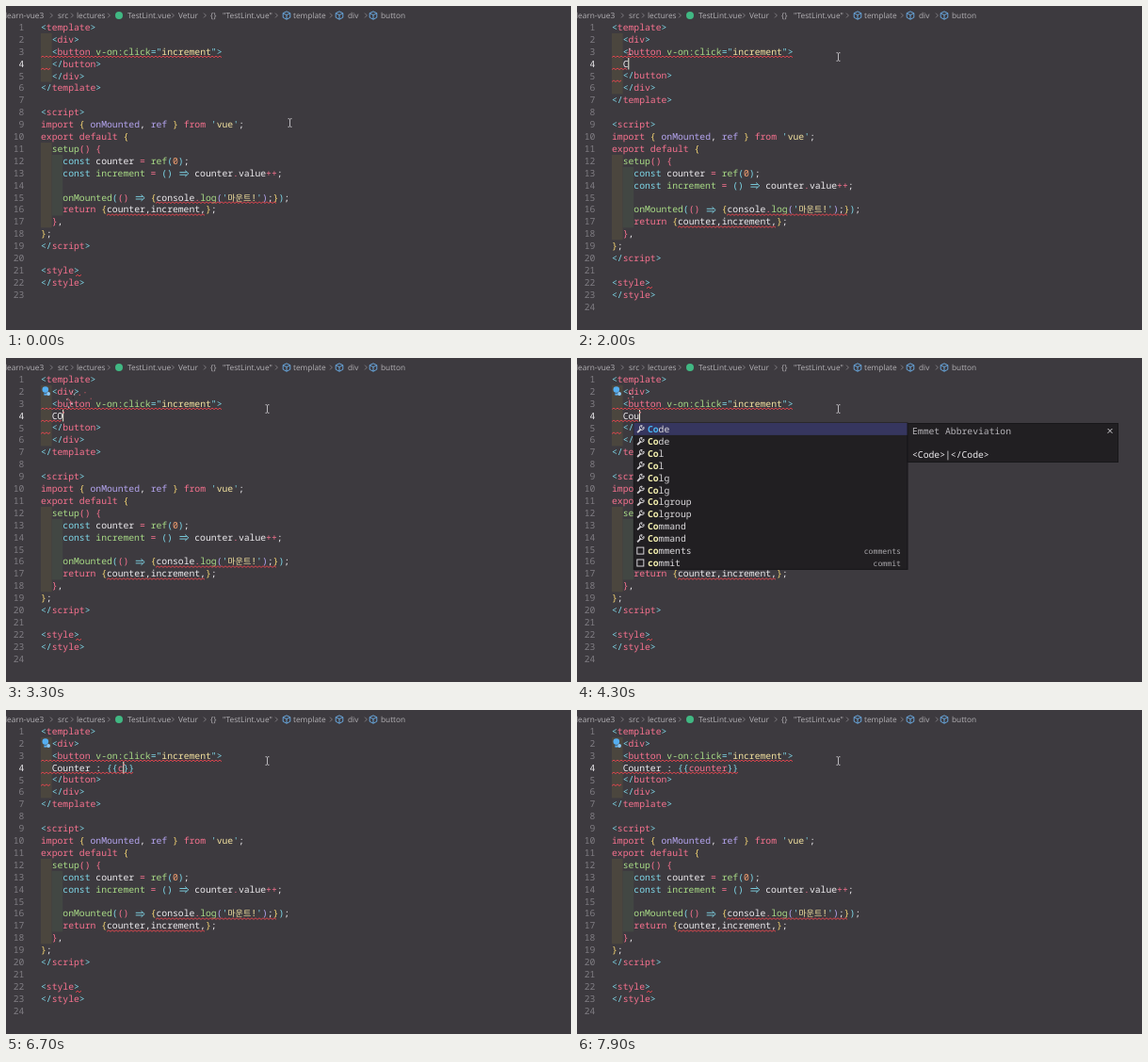
An HTML page that plays this animation: 600 px wide and 344 px high, repeating every 8 s.

```html
<!DOCTYPE html>
<html lang="en">
<head>
<meta charset="utf-8">
<title>Editor typing</title>
<style>
  html, body { margin: 0; width: 100%; height: 100%; overflow: hidden; background: #3d3a3f; }
  svg { display: block; width: 600px; height: 344px; }
  text { white-space: pre; font: 500 9.72px "Noto Sans Mono", "DejaVu Sans Mono", monospace; text-rendering: geometricPrecision; }
  .crumb { font: 8.3px "Open Sans", "Noto Sans", sans-serif; fill: #b4b2b6; }
  .ko { font: 9px "Noto Sans CJK KR", "Noto Sans CJK", sans-serif; }
  .side { font-size: 8.2px; text-anchor: end; fill: #a9a7ab; }
  .b { font-weight: 700; }
  path { fill: none; }
</style>
</head>
<body>
<svg id="stage" viewBox="0 0 600 344"></svg>
<script>
const LOOP = 8000, STEP = 100, CW = 5.832, RH = 12.9, LEFT = 37;
const stage = document.getElementById('stage');
const colX = c => LEFT + c * CW;
const rowY = n => 22.5 + (n - 1) * RH;
const esc = s => s.replace(/&/g, '&amp;').replace(/</g, '&lt;');
const rect = (x, y, w, h, fill, more = '') => `<rect x="${x}" y="${y}" width="${w}" height="${h}" fill="${fill}" ${more}/>`;
const text = (x, y, s, fill, cls = '') => `<text x="${x}" y="${y + 3.4}" fill="${fill}" class="${cls}">${s}</text>`;
const line = (d, color, w = 1) => `<path d="${d}" stroke="${color}" stroke-width="${w}"/>`;

const INK = { c: '#7fd9ea', p: '#f8728f', g: '#a9dc86', y: '#f7d774', v: '#b5a5f0', w: '#eeecef', o: '#f5a070', k: '#f5e3a0' };

// Tokens are split by ~, the first letter is the ink.
const head = [
  [0, 'c<~ptemplate~c>'],
  [2, 'c<~pdiv~c>'],
  [2, 'c<~pbutton~g v-on:click~c="~kincrement~c">']
];
const tail = [
  [2, 'c</~pbutton~c>'],
  [2, 'c</~pdiv~c>'],
  [0, 'c</~ptemplate~c>'],
  [0, ''],
  [0, 'c<~pscript~c>'],
  [0, "pimport~y { ~vonMounted~w, ~vref~y }~p from~c '~kvue~c'~w;"],
  [0, 'pexport default~y {'],
  [2, 'gsetup~p() {'],
  [4, 'cconst~w counter ~p=~g ref~c(~o0~c)~w;'],
  [4, 'cconst~g increment~p = ~c()~w    counter~p.~wvalue~p++~w;'],
  [0, ''],
  [4, "gonMounted~c(~p()~w    ~y{~wconsole~p.~glog~v(~c'~k마운트!~c'~v)~w;~y}~c)~w;"],
  [4, 'preturn~y {~wcounter,increment,~y}~w;'],
  [2, 'p}~w,'],
  [0, 'y}~w;'],
  [0, 'c</~pscript~c>'],
  [0, ''],
  [0, 'c<~pstyle~c>'],
  [0, 'c</~pstyle~c>']
];

function tokens(src) {
  return src.split('~').map(t => {
    const body = esc(t.slice(1)).replace(/[가-힣]+/, m => `<tspan class="ko">${m}</tspan>`);
    return `<tspan fill="${INK[t[0]]}">${body}</tspan>`;
  }).join('');
}
const codeLine = ([indent, src], n) => src ? text(colX(indent), rowY(n), tokens(src), INK.w) : '';

function wave(x0, x1, n) {
  const y = rowY(n) + 5.6;
  let d = `M${x0} ${y + 0.8}`;
  for (let x = x0 + 2, up = true; x <= x1; x += 2, up = !up) d += `L${x} ${y + (up ? -0.8 : 0.8)}`;
  return line(d, '#ef4650', 0.9);
}

function arrow(c, n) {
  const x = colX(c) + 1.6, y = rowY(n) + 0.6;
  return line(`M${x} ${y - 1.3}h7.4M${x} ${y + 1.3}h7.4M${x + 5.8} ${y - 3.2}l3.6 3.2l-3.6 3.2`, INK.c, 0.9);
}

const band = (level, from, to) =>
  rect(colX(level * 2), rowY(from) - RH / 2, 2 * CW, (to - from + 1) * RH, level ? '#424743' : '#4b463e');

function cube(x) {
  return line(`M${x} 5.8l3.8 1.8v4.6l-3.8 2l-3.8 -2v-4.6zM${x - 3.8} 7.6l3.8 1.9l3.8 -1.9M${x} 9.5v4.7`, '#6cb2ec', 0.9);
}

function crumbs() {
  const words = [[-1, 'learn-vue3'], [55, 'src'], [75, 'lectures'], [129, 'TestLint.vue'], [183, 'Vetur'],
    [217, '{}'], [230, '"TestLint.vue"'], [305, 'template'], [363, 'div'], [398, 'button']];
  return words.map(([x, s]) => `<text class="crumb" x="${x}" y="13">${s}</text>`).join('') +
    [47, 69, 108, 176, 210, 286, 344, 381].map(x => line(`M${x} 7.6l2.4 2.4l-2.4 2.4`, '#8d8b90', 0.8)).join('') +
    '<circle cx="120" cy="10" r="4" fill="#41b883"/>' + [298, 354, 390].map(cube).join('');
}

const topPart = crumbs() + band(0, 2, 3) + head.map((l, i) => codeLine(l, i + 1)).join('') + wave(37, 229, 3);
const tailPart = band(0, 4, 5) + band(0, 11, 17) + band(1, 12, 16) +
  tail.map((l, i) => codeLine(l, i + 4)).join('') + arrow(25, 13) + arrow(17, 15) +
  wave(37, 48, 4) + wave(159, 288, 15) + wave(107, 212, 16) + wave(74, 80, 21);

// time, typed text, caret offset from the end
const keys = [
  [1400, ''], [1900, 'C'], [2100, 'CO'], [2200, 'COu'], [2400, 'COun'], [2600, 'COunt'], [2800, 'COunte'],
  [3000, 'COunt'], [3100, 'COun'], [3200, 'COu'], [3300, 'CO'], [3400, 'C'], [3500, ''],
  [3800, 'C'], [4100, 'Co'], [4300, 'Cou'], [4400, 'Coun'], [4600, 'Count'], [4700, 'Counte'], [4800, 'Counter'],
  [4900, 'Counter '], [5500, 'Counter :'], [5700, 'Counter : '], [6000, 'Counter : {}', 1], [6200, 'Counter : {{}}', 2],
  [6700, 'Counter : {{c}}', 2], [6900, 'Counter : {{co}}', 2], [7100, 'Counter : {{cou}}', 2], [7300, 'Counter : {{counter}}', 2]
];
const caretCol = k => 2 + k[1].length - (k[2] || 0);

const tags = ['Code', 'Code', 'Col', 'Col', 'Colg', 'Colg', 'Colgroup', 'Colgroup', 'Command', 'Command', 'comments', 'commit'];
const emmet = {
  rows: tags.map((s, i) => [`[${s.slice(0, 2)}]${s.slice(2)}`, i > 9 ? s : '']),
  w: 223.5, h: 41, doc: [[78, 'Emmet Abbreviation'], [103, '<Code>|</Code>']]
};
const config = {
  rows: [['App[Con]figIsC[u]stomElement', 'isCustomElement'], ['Vue[Con]figProd[u]ctionTip', 'productionTip']],
  w: 224.5, h: 54,
  doc: [[78, 'app.config.isCustomElement(Vue 3 S'], [90.5, 'nippets)'], [114, 'app.config.isCustomElement =']]
};
const names = ['counter', 'const', 'continue', 'console', 'confirm', 'close', 'clear', 'class', 'case', 'catch', 'crypto', 'caches'];
const scope = { rows: names.map(s => [`[c]${s.slice(1)}`, '']), w: 184, h: 41, doc: [[78, 'counter'], [103, 'const counter: any']] };

// from, to, column, content
const popups = [
  [2100, 2300, 4, emmet], [2300, 2600, 6, config], [2600, 2800, 7, config], [2800, 3000, 8, config],
  [4200, 4400, 4, emmet], [4400, 4600, 6, config], [4600, 4700, 7, config], [6800, 7300, 15, scope]
];

function icon(x, y, snippet) {
  return snippet
    ? `<rect x="${x - 3.5}" y="${y - 3.5}" width="7" height="7" fill="none" stroke="#d5d3d7"/>`
    : line(`M${x - 3.2} ${y + 3.6}l3.6 -3.6`, '#d5d3d7', 1.8) +
      line(`M${x + 3.8} ${y - 2.2}a2.4 2.4 0 1 1 -2 -1.8l-.6 1.8l1 1z`, '#d5d3d7', 1);
}

function popup([, , col, list]) {
  const x = colX(col), y = 69, w = 290.7, h = list.rows.length * RH + 0.6, dx = x + w;
  let out = rect(x, y, w, h, '#211f22', 'stroke="#18171a" stroke-width="1"') + rect(x, y, w, RH, '#36365f');
  list.rows.forEach(([label, side], i) => {
    const cy = y + 6.6 + i * RH;
    const body = label.split(/[\[\]]/).map((s, j) =>
      j % 2 ? `<tspan class="b" fill="${i ? '#f3efae' : '#48b4f2'}">${s}</tspan>` : s).join('');
    out += icon(x + 7, cy, side || list === scope) + text(x + 14.6, cy, body, '#dcdadd');
    if (side) out += text(dx - 7, cy, side, '#a9a7ab', 'side');
  });
  out += rect(dx, y + 0.5, list.w, list.h, '#211f22', 'stroke="#18171a" stroke-width="1"');
  list.doc.forEach(([cy, s], i) => {
    out += text(dx + 5, cy, esc(s), i === list.doc.length - 1 ? '#eeecef' : '#b5b3b8');
  });
  const cx = dx + list.w - 8.5;
  return out + line(`M${cx - 2.4} 75l4.8 4.8m0 -4.8l-4.8 4.8`, '#d5d3d7');
}

const rand = s => { const v = Math.sin(s * 127.1 + 11.7) * 43758.5453; return v - Math.floor(v); };

// Small sparks thrown up by each key press
function sparks(t) {
  let out = '';
  keys.forEach((k, i) => {
    const age = (t - k[0]) / 500;
    if (age < 0 || age >= 1 || k[0] < 1900) return;
    for (let j = 0; j < 5; j++) {
      const r = n => rand(i * 31 + j * 7 + n);
      const x = Math.max(38, colX(caretCol(k)) + (r(1) - 0.45) * 44 * age);
      const y = Math.max(30, 57 - (14 + 22 * r(2)) * Math.sqrt(age) + 5 * age);
      out += rect(x, y, 1.3, 1.3, ['#f1eff2', '#e0606c', '#29272b'][j % 3], `opacity="${1 - age * 0.6}"`);
    }
  });
  return out;
}

const bulb = () => '<circle cx="41.8" cy="33.6" r="3.3" fill="#55aef0"/>' + rect(40.4, 36.6, 2.8, 3, '#55aef0') +
  '<circle cx="45" cy="38" r="2" fill="#8cc9f6"/>' + line('M40.2 37.4h3.2', '#3d3a3f', 0.6);

function pointer(t) {
  const p = Math.min(1, Math.max(0, t / 600)), e = p * p * (3 - 2 * p);
  const x = 301.5 - 24 * e, y = 124 - 70 * e;
  return line(`M${x - 2} ${y - 4.3}h1.4l.6 .6l.6 -.6h1.4M${x} ${y - 3.8}v7.6M${x - 2} ${y + 4.3}h1.4l.6 -.6l.6 .6h1.4`, '#c9c7cb', 0.9);
}

function typed(s) {
  const cut = s.indexOf('{'), plain = cut < 0 ? s : s.slice(0, cut);
  let src = 'w' + plain;
  if (cut >= 0) {
    const [, open, name, close] = s.slice(cut).match(/^({+)(\w*)(}+)$/);
    src += `~c${open}~p${name}~c${close}`;
  }
  return text(colX(2), rowY(4), tokens(src), INK.w);
}

const caret = (c, n) => rect(colX(c) - 0.2, rowY(n) - 6.2, 1, 12.4, '#f2f0dc');

function draw(t) {
  const key = keys.filter(k => k[0] <= t).pop();
  const active = t >= 600 && t < 1400 ? 3 : 4;
  let out = rect(0, 0, 600, 344, '#3d3a3f') + topPart +
    `<g transform="translate(0 ${key ? RH : 0})">${tailPart}</g>`;
  for (let n = 1; n <= (key ? 24 : 23); n++) {
    out += text(19.4 - String(n).length * CW, rowY(n), n, n === active ? '#e9e7ea' : '#7f7c82');
  }
  if (key) {
    out += band(0, 4, 4) + typed(key[1]) + wave(37, colX(2 + key[1].length), 4);
    if ((t - key[0]) % 1000 < 500) out += caret(caretCol(key), 4);
  } else if (t >= 600 && t < 1100) {
    out += caret(33, 3);
  }
  if (t >= 3000) out += bulb();
  out += popups.filter(p => t >= p[0] && t < p[1]).map(popup).join('');
  stage.innerHTML = out + sparks(t) + pointer(t);
}

let last = -1;
const start = performance.now();
function tick(now) {
  const t = Math.floor((Math.max(0, now - start) % LOOP) / STEP) * STEP;
  if (t !== last) draw(last = t);
  requestAnimationFrame(tick);
}
draw(last = 0);
requestAnimationFrame(tick);
</script>
</body>
</html>
```
